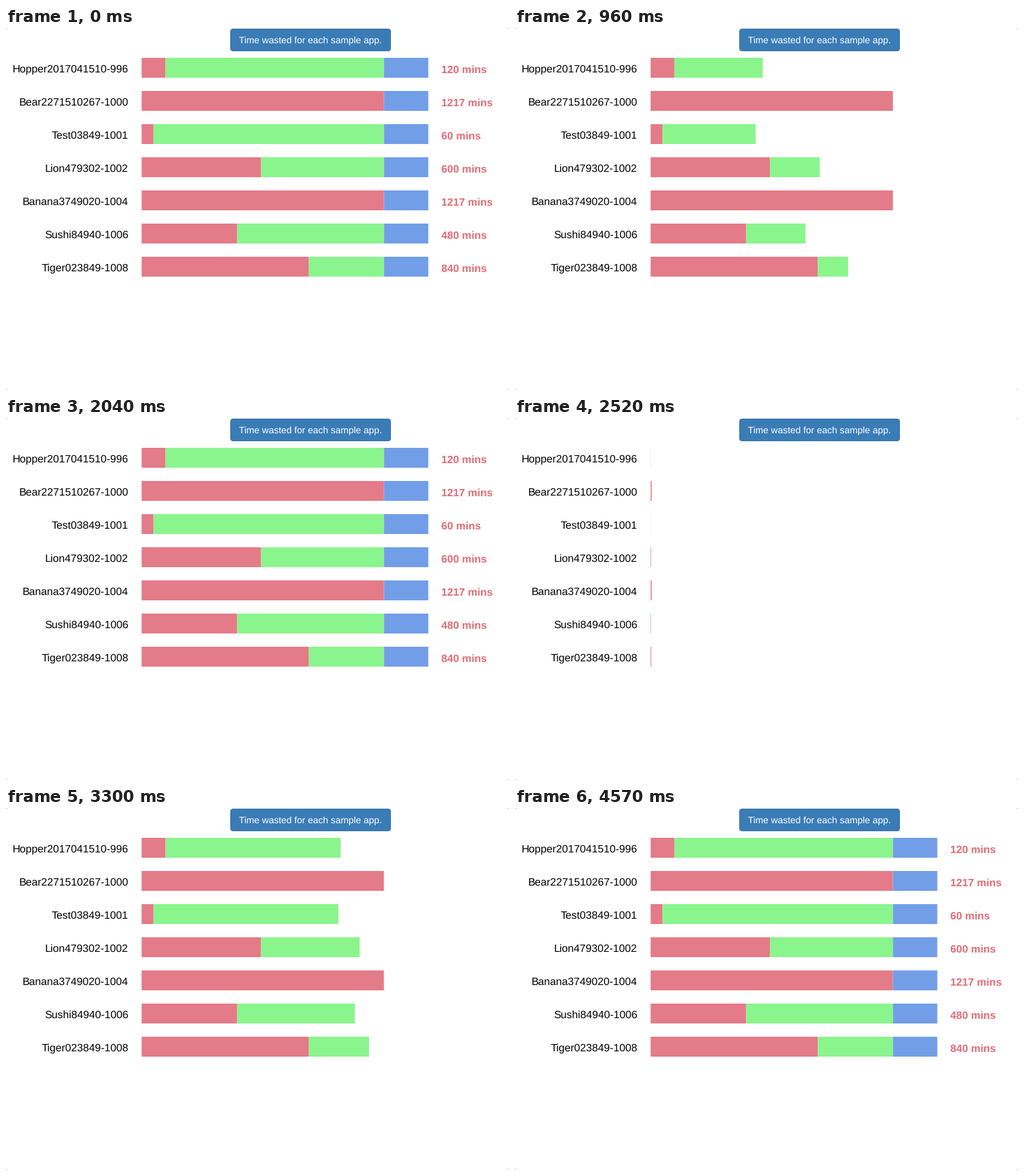
Write a matplotlib script that moves like this. It is 758 px wide and 546 px high and loops after 4.62 s.

```python
import matplotlib.pyplot as plt
from matplotlib.animation import FuncAnimation
from matplotlib.patches import FancyBboxPatch, Rectangle

W, H, DPI = 758, 546, 100
LOOP, TICK, STEPS = 4620, 20, 106   # loop and tick in ms, poses per loop
X0, SCALE = 204.4, 0.3              # bar origin, pixels per minute
USED, DAY = 1217, 1440              # minutes
GROW = 500                          # ms for one segment to grow
FIRST_ROW_LEAD = 17                 # the top blue bar starts a little early

RED, GREEN, BLUE = "#e47b88", "#8af58c", "#729ee8"

ROWS = [
    ("Hopper2017041510-996", 120),
    ("Bear2271510267-1000", 1217),
    ("Test03849-1001", 60),
    ("Lion479302-1002", 600),
    ("Banana3749020-1004", 1217),
    ("Sushi84940-1006", 480),
    ("Tiger023849-1008", 840),
]

# Start times of the red, green and blue segments and of the minutes text.
CYCLES = [(239, 726, 1212, 1715), (2477, 2996, 3495, 3995)]
DONE = (-GROW,) * 4

plt.rcParams.update({
    "font.family": "Liberation Sans",
    "text.hinting": "none",
    "toolbar": "None",
})

fig = plt.figure(figsize=(W / DPI, H / DPI), dpi=DPI, facecolor="#b8b8b8")
ax = fig.add_axes([0, 0, 1, 1])
ax.set_xlim(0, W)
ax.set_ylim(H, 0)
ax.axis("off")


def px(size):
    return size * 72 / DPI


def rounded(x, y, w, h, radius, **style):
    style_name = f"round,pad=0,rounding_size={radius}"
    ax.add_patch(FancyBboxPatch((x, y), w, h, boxstyle=style_name, **style))


def write(x, y, text, size, **style):
    return ax.text(x, y, text, fontsize=px(size), va="baseline", **style)


def add_bar(start, y, color):
    bar = Rectangle((X0 + start * SCALE, y), 0, 30, fc=color, lw=0, snap=False)
    return ax.add_patch(bar)


def ease(p):
    """Cubic in-out."""
    p = min(max(p, 0), 1)
    return 4 * p ** 3 if p < 0.5 else 1 - (2 - 2 * p) ** 3 / 2


rounded(0, 0, W, H, 3, fc="white", lw=0)
rounded(338.5, 1.5, 241, 33, 4, fc="#3a7cb6", ec="#316fa6", lw=px(1))
write(459, 23, "Time wasted for each sample app.", 14.1, color="white", ha="center")

bars, totals = [], []
for i, (name, mins) in enumerate(ROWS):
    y = 45 + 50 * i
    write(184.5, y + 22, name, 16.1, color="black", ha="right")
    totals.append(write(656.3, y + 23, f"{mins} mins", 16,
                        color="#e06c78", weight="bold"))
    segments = [(0, mins, RED), (mins, USED - mins, GREEN), (USED, DAY - USED, BLUE)]
    for part, (start, length, color) in enumerate(segments):
        lead = FIRST_ROW_LEAD if (i, part) == (0, 2) else 0
        bars.append((add_bar(start, y, color), length * SCALE, part, lead))


def update(frame):
    step = int((frame * TICK + 15) * STEPS / LOOP) % STEPS
    t = step * LOOP / STEPS
    starts = DONE
    for cycle in CYCLES:
        if t >= cycle[0]:
            starts = cycle
    for bar, width, part, lead in bars:
        bar.set_width(width * ease((t - starts[part] + lead) / GROW))
    for total in totals:
        total.set_visible(t >= starts[3])
    return [bar for bar, *_ in bars] + totals


anim = FuncAnimation(fig, update, frames=LOOP // TICK, interval=TICK,
                     repeat=True, repeat_delay=0, blit=False)
plt.show()
```
